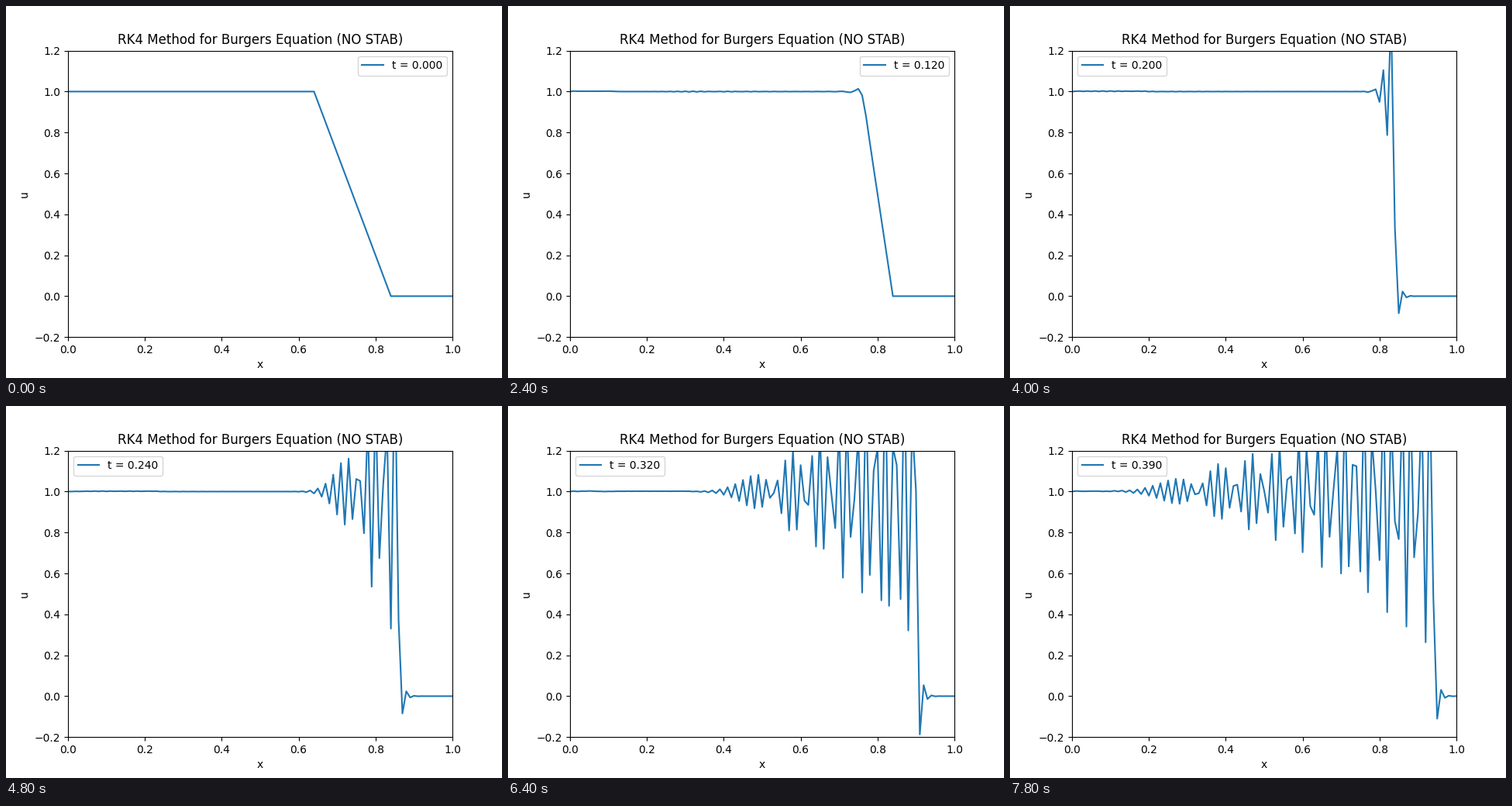
These frames come from a looping animation (640 by 480 pixels, 8 s). A matplotlib script:

```python
import numpy as np
import matplotlib.pyplot as plt
from matplotlib.animation import FuncAnimation

CELLS = 100
H = 1.0 / CELLS
DT = 0.01
STEPS = 40
INLET = 1.0


def mass_matrix():
    """Consistent mass of linear elements, inlet row replaced by identity."""
    m = np.zeros((CELLS + 1, CELLS + 1))
    for i in range(CELLS):
        m[i:i + 2, i:i + 2] += H / 6 * np.array([[2, 1], [1, 2]])
    m[0] = 0
    m[0, 0] = 1
    return m


def convection(u):
    """Galerkin integral of N * u * du/dx."""
    a, b = u[:-1], u[1:]
    c = np.zeros_like(u)
    c[:-1] += (b - a) * (2 * a + b) / 6
    c[1:] += (b - a) * (a + 2 * b) / 6
    return c


def rate(u):
    rhs = -convection(u)
    rhs[0] = INLET
    return M_INV @ rhs


def rk4_step(u):
    k1 = rate(u)
    k2 = rate(u + DT / 2 * k1)
    k3 = rate(u + DT / 2 * k2)
    k4 = rate(u + DT * k3)
    new = u + DT / 6 * (k1 + 2 * k2 + 2 * k3 + k4)
    new[0] = INLET
    return new


M_INV = np.linalg.inv(mass_matrix())
x = np.linspace(0, 1, CELLS + 1)
history = [np.interp(x, [0.64, 0.84], [1, 0])]
for _ in range(STEPS - 1):
    history.append(rk4_step(history[-1]))

fig, ax = plt.subplots(figsize=(6.4, 4.8), dpi=100)
line, = ax.plot(x, history[0], label="t = 0.000")
ax.set_xlim(0, 1)
ax.set_ylim(-0.2, 1.2)
ax.set_xlabel("x")
ax.set_ylabel("u")
ax.set_title("RK4 Method for Burgers Equation (NO STAB)")
label = ax.legend(loc="best").get_texts()[0]


def update(n):
    line.set_ydata(history[n])
    label.set_text(f"t = {n * DT:.3f}")
    return line, label


anim = FuncAnimation(fig, update, frames=STEPS, interval=200,
                     repeat=True, repeat_delay=0, blit=False)
plt.show()
```
